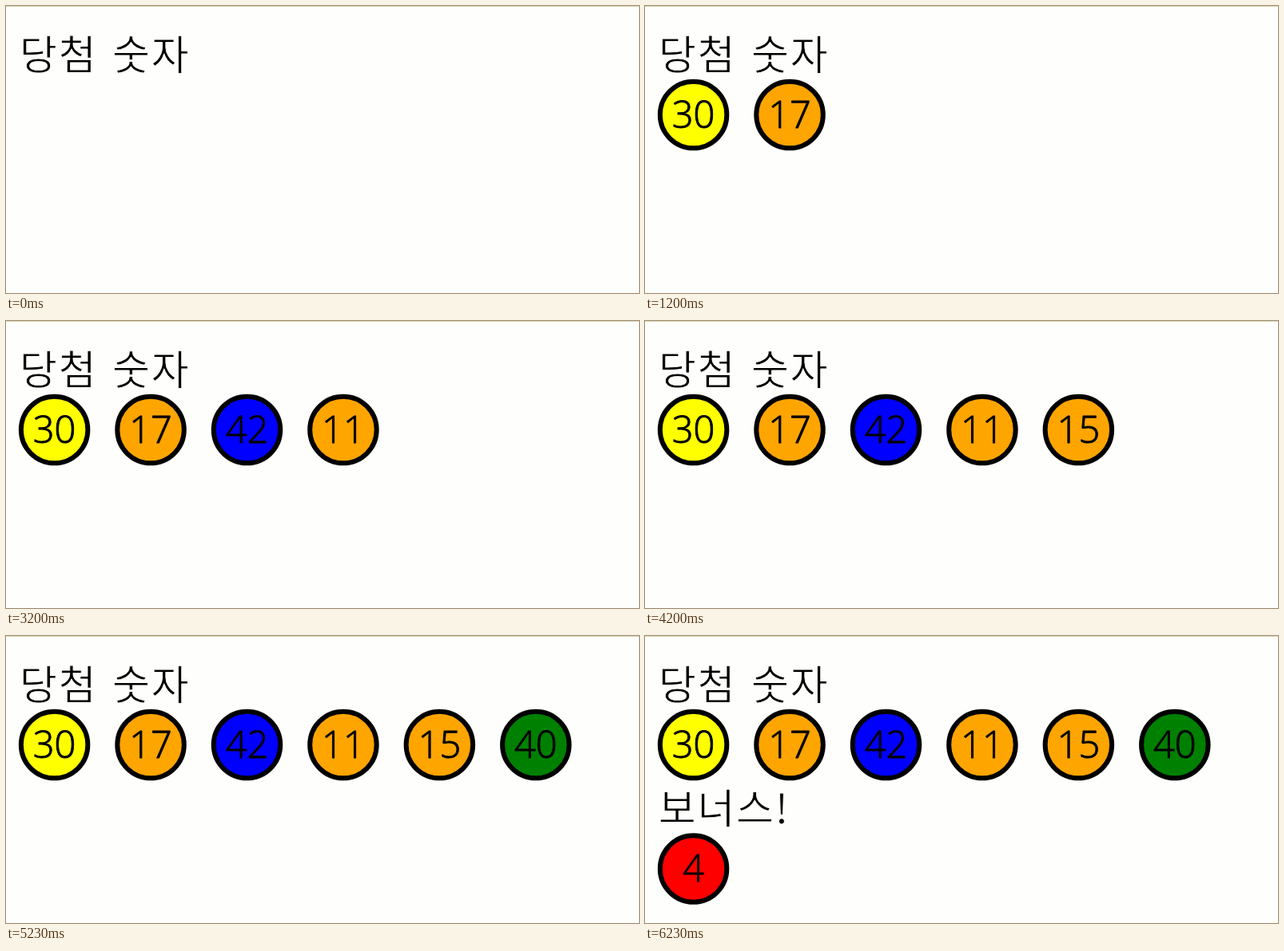
Animation, 792 px wide and 360 px high, one loop 7.93 s. Source, as an HTML page with a canvas:

```html
<!DOCTYPE html>
<html lang="ko">
<head>
<meta charset="utf-8">
<title>당첨 숫자</title>
<style>
html, body { margin: 0; width: 100%; height: 100%; overflow: hidden; background: #fefefc; }
canvas { display: block; }
</style>
</head>
<body>
<canvas id="stage" width="792" height="360"></canvas>
<script>
const ctx = document.getElementById('stage').getContext('2d');
const LOOP = 7930;
const PAPER = '#fefefc', INK = '#000', ORANGE = '#ffa500';
const HANGUL = '300 51px "Noto Sans CJK KR", "Noto Sans CJK JP", "Noto Sans CJK", sans-serif';
const DIGITS = '300 47px "Open Sans", "Noto Sans", sans-serif';

// Each ball: appearance time, number, fill, column, centre y
const balls = [
  [200, 30, '#ffff00', 0, 136.5],
  [1200, 17, ORANGE, 1, 136.5],
  [2200, 42, '#0000ff', 2, 136.5],
  [3200, 11, ORANGE, 3, 136.5],
  [4200, 15, ORANGE, 4, 136.5],
  [5230, 40, '#008000', 5, 136.5],
  [6200, 4, '#ff0000', 0, 292]
];

// The edge stroke thins the text in paper colour or thickens it in ink
function print(text, x, y, edge, width) {
  ctx.fillStyle = INK;
  ctx.fillText(text, x, y);
  ctx.strokeStyle = edge;
  ctx.lineWidth = width;
  ctx.strokeText(text, x, y);
}

// Syllables sit on a fixed pitch, centred in their cells
function label(text, x, y) {
  ctx.font = HANGUL;
  [...text].forEach((ch, i) => print(ch, x + i * 48.6, y, PAPER, 0.9));
}

function ball(n, fill, col, y) {
  const x = 60.6 + col * 120.45;
  ctx.beginPath();
  ctx.arc(x, y, 41.75, 0, Math.PI * 2);
  ctx.fillStyle = fill;
  ctx.fill();
  ctx.lineWidth = 6;
  ctx.strokeStyle = INK;
  ctx.stroke();
  ctx.font = DIGITS;
  print(n, x, y + 16, INK, 0.9);
}

function draw(t) {
  ctx.fillStyle = PAPER;
  ctx.fillRect(0, 0, 792, 360);
  ctx.fillStyle = '#d9d9b0';
  ctx.fillRect(0, 0, 792, 1);
  ctx.textAlign = 'center';
  ctx.lineJoin = 'round';
  label('당첨', 40.5, 79.5);
  label('숫자', 156.5, 79.5);
  if (t >= 5730) {
    label('보너스', 40.3, 234.5);
    label('!', 171, 234.5);
  }
  for (const [at, ...spec] of balls) if (t >= at) ball(...spec);
}

const start = performance.now();
function tick() {
  draw((performance.now() - start) % LOOP);
  requestAnimationFrame(tick);
}
tick();
</script>
</body>
</html>
```
